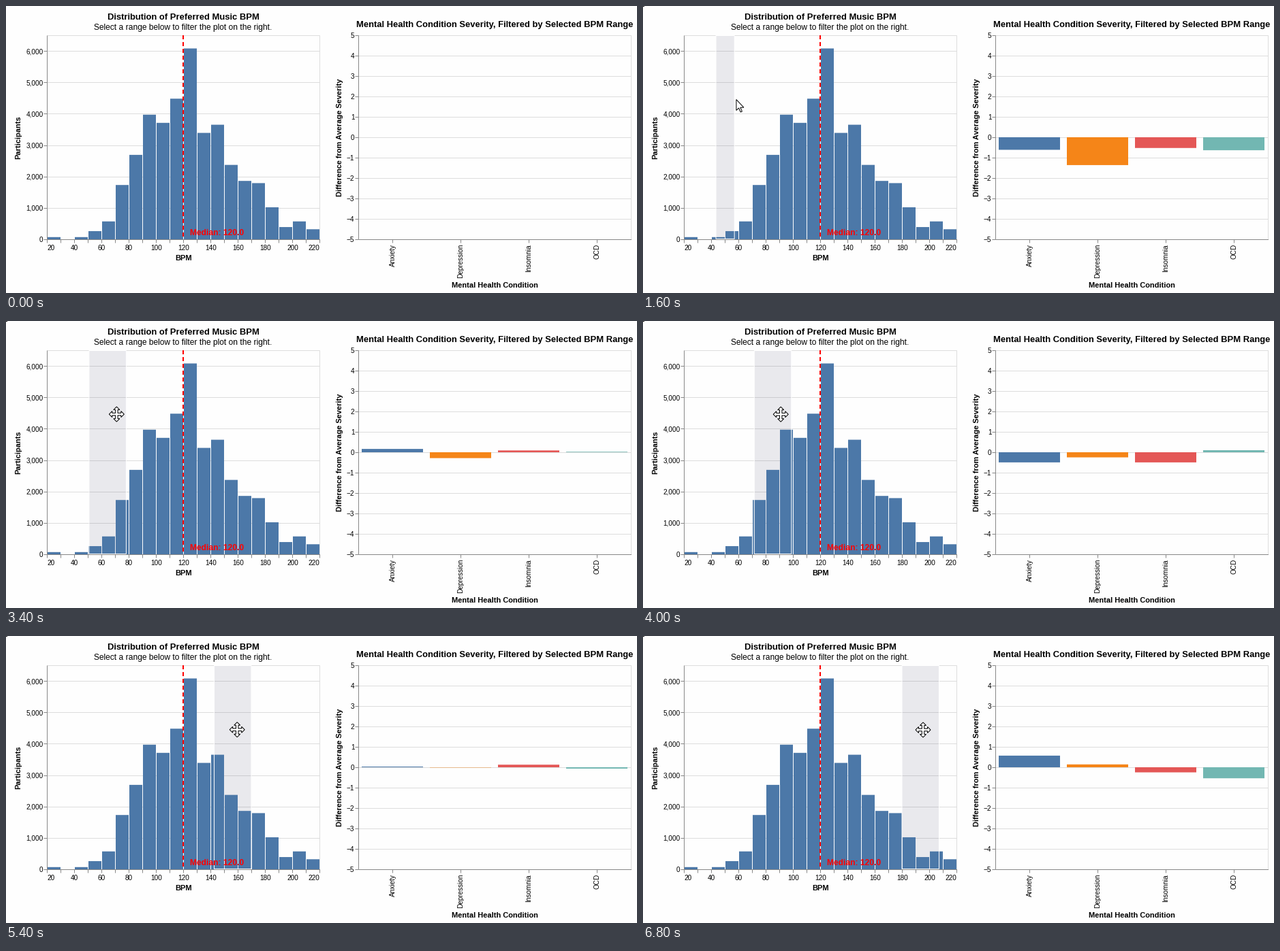
A matplotlib script that plays this animation: 926 px wide and 422 px high, repeating every 7 s.

```python
import matplotlib.pyplot as plt
import numpy as np
from matplotlib.animation import FuncAnimation
from matplotlib.patches import Polygon, Rectangle

W, H, DPI = 926, 422, 100
FRAMES, INTERVAL = 35, 200
PT = 72 / DPI  # points per pixel

BLUE, ORANGE, RED, TEAL = "#4c78a8", "#f58518", "#e45756", "#72b7b2"
GRID, AXIS = "#dddddd", "#888888"
TOP, BOTTOM, ZERO = 43.5, 343.5, 193

plt.rcParams["font.family"] = "Liberation Sans"
fig = plt.figure(figsize=(W / DPI, H / DPI), dpi=DPI, facecolor="#fefefe")
ax = fig.add_axes([0, 0, 1, 1])
ax.set_xlim(0, W)
ax.set_ylim(H, 0)
ax.axis("off")


def line(x0, y0, x1, y1, color, width=1, z=1, **kw):
    ax.plot([x0, x1], [y0, y1], color=color, lw=width * PT, zorder=z,
            solid_capstyle="butt", snap=False, **kw)


def text(x, y, s, px=10, bold=False, ha="center", rotation=0, color="black"):
    ax.text(x, y, s, fontsize=px * PT, weight="bold" if bold else "normal",
            ha=ha, va="baseline", rotation=rotation, rotation_mode="anchor",
            color=color, zorder=7)


def box(x, y, w, h, z, lw=0, **kw):
    return ax.add_patch(Rectangle((x, y), w, h, zorder=z, lw=lw, snap=False, **kw))


def panel(left, y_ticks, x_ticks):
    """Grid, border, axis lines and labelled y ticks of one chart."""
    right = left + 400
    for y, label in y_ticks:
        line(left, y, right, y, GRID)
        line(left - 5, y, left, y, AXIS, z=2)
        text(left - 6, y + 3.5, label, ha="right")
    line(left, TOP, right, TOP, GRID)
    line(right, TOP, right, BOTTOM, GRID)
    line(left, TOP, left, BOTTOM, AXIS, z=2)
    line(left, BOTTOM, right + 0.5, BOTTOM, AXIS, z=2)
    for x in x_ticks:
        line(x, BOTTOM, x, BOTTOM + 5, AXIS, z=2)


# Histogram: participants per 10 BPM, from 20 BPM up
COUNTS = [80, 0, 80, 270, 580, 1740, 2700, 3980, 3720, 4490,
          6090, 3400, 3660, 2380, 1870, 1800, 1030, 400, 580, 330]
Y_SCALE = 300 / 6500

panel(60.5,
      [(round(343 - k * 1000 * Y_SCALE) + 0.5, f"{k * 1000:,}") for k in range(7)],
      60.5 + 20 * np.arange(21))
for i, count in enumerate(COUNTS):
    if count:
        top = BOTTOM - count * Y_SCALE
        box(61 + 20 * i, top, 19, 343 - top, 4, fc=BLUE)

for bpm in range(20, 221, 20):
    ha = {20: "left", 220: "right"}.get(bpm, "center")
    text(60.5 + 2 * (bpm - 20), 359, str(bpm), ha=ha)
text(260, 20, "Distribution of Preferred Music BPM", 13, True)
text(260, 35, "Select a range below to filter the plot on the right.", 12)
text(260.5, 374, "BPM", 11, True)
text(21, 193.5, "Participants", 11, True, rotation=90)

RULE = 2
line(260, 43, 260, 343, "red", RULE, z=6,
     linestyle=(0, (6 / RULE, 4 / RULE)), dash_capstyle="butt")
text(270, 337, "Median: 120.0", 12, True, ha="left", color="red")

# Severity chart: difference as the brush's right edge reaches each stop
STOPS = [134, 161.5, 218, 298, 409, 434.5]
CONDITIONS = [("Anxiety", BLUE, [-0.62, 0.4, -0.5, 0, 0.06, 0.57]),
              ("Depression", ORANGE, [-1.37, -0.3, -0.25, 0.02, -0.04, 0.14]),
              ("Insomnia", RED, [-0.53, 0.3, -0.5, 0.02, 0.21, -0.25]),
              ("OCD", TEAL, [-0.64, 0, 0.1, -0.2, 0.04, -0.54])]

panel(517.5,
      [(193.5 - 30 * v, str(v).replace("-", "\u2212")) for v in range(-5, 6)],
      567.5 + 100 * np.arange(4))
bars = []
for i, (name, color, _) in enumerate(CONDITIONS):
    text(570.5 + 100 * i, 350, name, ha="right", rotation=90)
    bars.append(box(522 + 100 * i, ZERO, 90, 0, 4, fc=color))
text(717, 31, "Mental Health Condition Severity, Filtered by Selected BPM Range", 13, True)
text(717.5, 414, "Mental Health Condition", 11, True)
text(493, 193.5, "Difference from Average Severity", 11, True, rotation=90)

# Brush and pointers
brush_fill = box(0, 43, 0, 300, 3, fc="#33335a", alpha=0.1)
brush_edge = box(0, TOP, 0, 299, 5, fc="none", ec="white", lw=PT)
corner = box(0, 0, 2, 1, 8, fc="black")

ARROW = np.array([(0.5, 0.5), (0.5, 16.5), (4.2, 13), (6.8, 19),
                  (9, 18), (6.5, 12.2), (11.5, 12.2)])
ARM = np.array([(-1.7, -1.7), (-1.7, -6.5), (-4.5, -6.5),
                (0, -11), (4.5, -6.5), (1.7, -6.5)])
TURN = np.array([(0, 1), (-1, 0)])
MOVE = np.vstack([ARM @ np.linalg.matrix_power(TURN, k) for k in range(4)])
pointer = ax.add_patch(Polygon(ARROW, closed=True, fc="white", ec="black",
                               lw=PT, zorder=9, joinstyle="miter"))

# Phases in frames: enter, stretch the brush, step back into it, drag it
ENTER, STRETCH, BACK, DRAG, END = 1, 6, 12, 14, 34


def progress(frame, start, stop):
    return np.clip((frame - start) / (stop - start), 0, 1)


def ease_in_out(u):
    return (1 - np.cos(np.pi * u)) / 2


def ease_out(u):
    return 1 - (1 - u) ** 1.7


def draw(frame):
    enter = ease_in_out(progress(frame, ENTER, STRETCH))
    stretch = ease_out(progress(frame, STRETCH, BACK))
    back = progress(frame, BACK, DRAG)
    drag = ease_in_out(progress(frame, DRAG, END))

    corner.set_visible(frame >= ENTER)
    pointer.set_visible(frame >= ENTER)
    x = 854 - 744 * enter + 53 * stretch - 15 * back + 263 * drag
    y = 369 - 232 * enter + drag
    pointer.set_xy((MOVE if frame >= DRAG else ARROW) + np.array((x, y)))

    active = frame > STRETCH
    left, width = 107 + 273 * drag, 54.5 * stretch
    for patch in (brush_fill, brush_edge):
        patch.set_visible(active)
        patch.set_x(left)
        patch.set_width(width)

    for bar, (_, _, values) in zip(bars, CONDITIONS):
        bar.set_visible(active)
        bar.set_height(-30 * np.interp(left + width, STOPS, values))
    return [corner, pointer, brush_fill, brush_edge, *bars]


anim = FuncAnimation(fig, draw, frames=FRAMES, interval=INTERVAL,
                     init_func=lambda: draw(0), repeat=True, repeat_delay=0)
plt.show()
```
